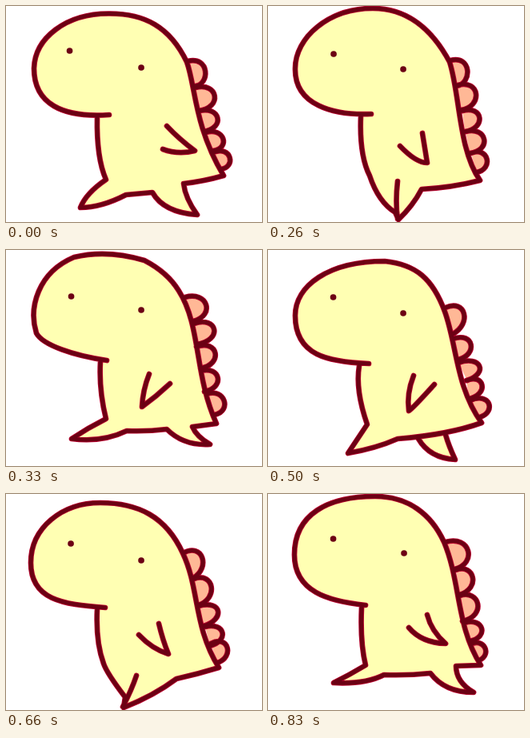
These frames come from a looping animation (320x270 px, 1000 ms). An HTML page with a canvas:

```html
<!DOCTYPE html>
<html lang="en">
<head>
<meta charset="utf-8">
<title>Walking dinosaur</title>
<style>
html, body { margin: 0; width: 100%; height: 100%; overflow: hidden; background: #fff; }
canvas { display: block; }
</style>
</head>
<body>
<canvas id="stage" width="320" height="270"></canvas>
<script>
const ctx = document.getElementById("stage").getContext("2d");
const SKIN = "#ffffb3", SPIKE = "#ffb896", INK = "#6c0014", RIM = "#bc002e";
const LOOP = 1000;

// Each drawing is held until its end time, then cut to the next.
const poses = [
  {
    end: 160,
    body: "M129 136C70 140 35 122 35 78C36 40 75 9.5 128 9.5C173 9 205 26 226 70C237 100 235 150 272 212Q248 219 222 222Q224 240 239 261Q197 258 183 233L150 236Q119 252 93 252Q100 234 125 217Q113 190 114 139",
    lines: "M201 150Q216 166 236 181Q215 186 196 179",
    spikes: "M227 69C255 62 255 99 236 100M237 102C265 95 271 127 241 131M242 131C267 125 275 152 247 157M250 158C272 151 282 178 258 181M259 183C282 174 288 202 268 204",
    eyes: "M79.5 56h.1M169 77h.1"
  },
  {
    end: 330,
    body: "M129 135C82 137 33 124 34 78C34 40 75 3 131 3C172 3 204 27 227 70C240 110 238 180 265 218Q230 227 192 229Q181 250 163 267L159 258Q138 245 127 212Q114 186 116 138",
    lines: "M193 159Q196 178 199 196Q185 196 165 175M162 219Q159 245 162 266",
    spikes: "M228 68C255 61 255 97 236 100M237 99C265 91 269 126 241 130M243 131C269 124 273 153 246 157M247 157C274 150 280 181 252 184M254 184C275 175 283 204 260 208",
    eyes: "M82 60h.1M169 79h.1"
  },
  {
    end: 500,
    body: "M126 138C85 132 46 119 38 104C28 72 40 28 85 9Q126 -1 173 13Q202 28 216 51C244 95 235 155 263 217L233 221Q238 233 255 243Q222 245 201 224Q176 227 151 226Q120 241 82 236Q103 222 125 211Q116 175 118 140",
    lines: "M179 155Q171 175 170 196Q188 183 205 167",
    spikes: "M224 59C252 51 262 82 234 89M235 92C264 82 272 113 238 118M238 121C265 111 272 143 243 148M244 151C268 145 274 172 248 177M251 180C273 172 283 201 261 206",
    eyes: "M81.5 58h.1M169 75h.1"
  },
  {
    end: 660,
    body: "M126 142C75 140 34 132 34 82C34 45 75 14 146 14C185 18 206 36 221 77C236 118 235 172 267 216Q225 231 162 236Q135 248 100 254L124 218Q109 175 114 145",
    lines: "M182 157Q173 180 176 201Q180 199 208 168",
    backLeg: "M188 236Q202 260 234 262Q226 245 222 231",
    spikes: "M222 72C247 61 255 92 231 105M231 111C258 102 262 131 238 137M238 141C266 131 276 154 249 163M248 163C270 154 277 180 251 186M253 188C277 177 286 202 265 209",
    eyes: "M81.5 59h.1M169 79h.1"
  },
  {
    end: 830,
    body: "M124 142C70 138 31 132 31 86C31 42 70 11 118 11C165 11 200 28 221 74C242 118 234 165 266 217Q240 225 213 231Q185 252 147 267L149 254Q126 224 122 212Q112 185 114 144",
    lines: "M191 162Q196 183 203 200Q183 194 166 176M163 227Q157 245 146 266",
    spikes: "M221 74C246 60 256 92 234 105M235 106C260 97 266 131 240 139M241 140C270 132 274 157 247 165M249 166C273 160 280 183 255 190M256 187C278 175 286 204 264 211",
    eyes: "M81 62h.1M169 83h.1"
  },
  {
    end: LOOP,
    body: "M122 139C75 134 33 122 33 76C33 25 75 3 134 3C175 3 204 25 220 60C241 110 235 165 266 214L235 215Q235 235 257 248Q221 248 203 224Q175 227 145 226Q122 238 82 236Q102 226 122 214Q115 185 117 142",
    lines: "M199 151Q204 171 222 187Q192 186 176 167",
    spikes: "M222 60C253 51 262 87 233 94M235 95C257 86 267 118 239 126M240 127C264 119 274 152 243 159M246 161C269 154 277 179 252 184M253 188C269 179 281 200 264 208",
    eyes: "M81.5 56h.1M170 74h.1"
  }
];

function fill(path, color) {
  ctx.fillStyle = color;
  ctx.fill(new Path2D(path));
}

function stroke(path, color, width) {
  ctx.strokeStyle = color;
  ctx.lineWidth = width;
  ctx.stroke(new Path2D(path));
}

function draw({ body, lines, spikes, eyes, backLeg = "" }) {
  ctx.fillStyle = "#fff";
  ctx.fillRect(0, 0, 320, 270);
  fill(spikes, SPIKE);
  fill(backLeg, SKIN);
  fill(body, SKIN);
  const outline = body + lines + spikes + backLeg;
  stroke(outline, RIM, 6.7);
  stroke(outline, INK, 5.1);
  stroke(eyes, INK, 7.6);
}

function tick() {
  const time = performance.now() % LOOP;
  draw(poses.find(pose => time < pose.end));
  requestAnimationFrame(tick);
}

ctx.lineCap = ctx.lineJoin = "round";
tick();
</script>
</body>
</html>
```
